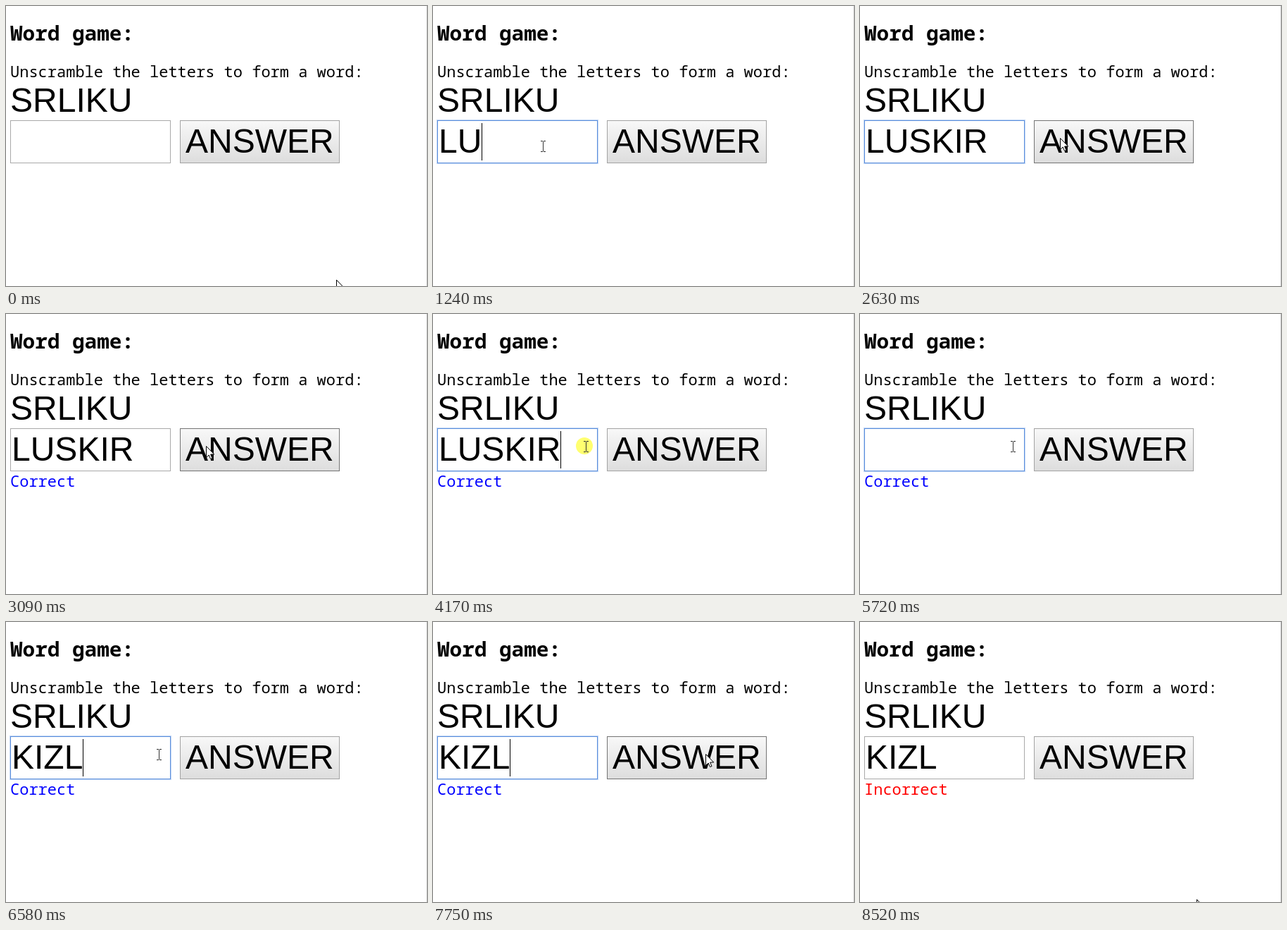
Recreate the animation shown at these times as an HTML page. Size 598 by 397 pixels, loop 8600 ms.

```html
<!DOCTYPE html>
<html lang="en">
<head>
<meta charset="utf-8">
<title>Word game</title>
<style>
  html, body { margin: 0; width: 100%; height: 100%; overflow: hidden; background: #fff; }
  svg { display: block; width: 598px; height: 397px; }
  text { white-space: pre; }
  .mono { font: 22px "Noto Sans Mono", "DejaVu Sans Mono", monospace; }
  .title { font-size: 29.33px; font-weight: 600; }
  .big { font: 48px "Liberation Sans", Arial, sans-serif; }
  .box { shape-rendering: crispEdges; }
</style>
</head>
<body>
<svg viewBox="0 0 598 397">
  <defs>
    <linearGradient id="face" x2="0" y2="1">
      <stop offset="0" stop-color="#f8f8f8"/>
      <stop offset="1" stop-color="#dddddd"/>
    </linearGradient>
    <linearGradient id="pressed" x2="0" y2="1">
      <stop offset="0" stop-color="#dddddd"/>
      <stop offset="1" stop-color="#f8f8f8"/>
    </linearGradient>
  </defs>
  <rect class="box" x="597" width="1" height="397" fill="#dcdcdc"/>
  <text class="mono title" x="6" y="49">Word game:</text>
  <text class="mono" x="6" y="101">Unscramble the letters to form a word:</text>
  <text class="big" x="6" y="150">SRLIKU</text>

  <rect id="glow" class="box" x="5.5" y="161.5" width="229" height="62" fill="none" stroke="#c3d7f5"/>
  <rect id="field" class="box" x="6.5" y="162.5" width="227" height="60" fill="#fff"/>
  <text id="entry" class="big" x="8" y="208"></text>
  <rect id="caret" class="box" y="166" width="1" height="53"/>

  <rect id="button" class="box" x="247.5" y="162.5" width="226" height="60"/>
  <text class="big" x="255" y="208">ANSWER</text>
  <text id="result" class="mono" x="6" y="245"></text>

  <g id="pointer">
    <circle id="ring" r="12" fill="#ffff70" style="mix-blend-mode: multiply"/>
    <path id="arrow" d="M.5 .5V16.5L4.2 13L6.6 18.5L9 17.5L6.6 12H11.7Z" fill="#fff" stroke="#000"/>
    <path id="beam" d="M-3 -7.5H0M1 -7.5H4M.5 -7V7M-3 7.5H0M1 7.5H4" fill="none" stroke="#333"/>
  </g>
</svg>
<script>
const LOOP = 8600;
const $ = id => document.getElementById(id);
const set = (id, attrs) => {
  for (const key in attrs) $(id).setAttribute(key, attrs[key]);
};
const show = (id, on) => set(id, { visibility: on ? "visible" : "hidden" });

const start = {
  at: [469, 388], beam: false, click: false, hover: false, press: false,
  focus: false, caret: false, entry: "", result: ""
};

// Each step: time in ms, then what changes
const steps = [
  [70, { at: [464, 376] }],
  [150, { at: [440, 335] }],
  [230, { at: [370, 276] }],
  [300, { at: [280, 232] }],
  [380, { at: [198, 206], beam: true }],
  [460, { at: [156, 199], click: true, focus: true, caret: true }],
  [530, { click: false }],
  [990, { caret: false }],
  [1070, { entry: "L", caret: true }],
  [1240, { entry: "LU" }],
  [1390, { entry: "LUS" }],
  [1540, { entry: "LUSK" }],
  [1770, { entry: "LUSKI" }],
  [1940, { entry: "LUSKIR" }],
  [2400, { at: [172, 198], caret: false }],
  [2480, { at: [214, 195] }],
  [2550, { at: [258, 191], beam: false, hover: true }],
  [2630, { at: [284, 187] }],
  [2860, { click: true, press: true, focus: false }],
  [3010, { press: false, result: "Correct" }],
  [3090, { click: false }],
  [3550, { at: [276, 187] }],
  [3630, { at: [256, 187] }],
  [3710, { at: [238, 188], hover: false }],
  [3780, { at: [224, 188], beam: true }],
  [3860, { at: [217, 188] }],
  [4170, { click: true, focus: true, caret: true }],
  [4320, { click: false }],
  [4550, { caret: false }],
  [4630, { entry: "LUSKI" }],
  [4710, { entry: "LUSK" }],
  [4860, { entry: "LUS" }],
  [5010, { entry: "LU" }],
  [5180, { entry: "L" }],
  [5250, { caret: true }],
  [5420, { entry: "" }],
  [5720, { caret: false }],
  [6120, { entry: "K", caret: true }],
  [6200, { entry: "KI" }],
  [6500, { entry: "KIZ" }],
  [6580, { entry: "KIZL" }],
  [7130, { at: [150, 212], caret: false }],
  [7210, { at: [69, 237] }],
  [7280, { at: [125, 232] }],
  [7360, { at: [215, 214] }],
  [7440, { at: [330, 196], beam: false }],
  [7510, { at: [400, 190] }],
  [7680, { at: [392, 188], hover: true, caret: true }],
  [7750, { at: [387, 187] }],
  [7830, { click: true, press: true, focus: false, caret: false }],
  [7910, { click: false, press: false, result: "Incorrect" }],
  [8210, { at: [405, 214] }],
  [8290, { at: [440, 305], hover: false }],
  [8370, { at: [460, 375] }],
  [8520, { at: [478, 393] }]
];

function stateAt(time) {
  const state = { ...start };
  for (const [t, change] of steps) {
    if (t > time) break;
    Object.assign(state, change);
  }
  return state;
}

function draw(s) {
  $("entry").textContent = s.entry;
  const width = s.entry ? $("entry").getComputedTextLength() : 0;
  set("caret", { x: Math.round(8 + width) });
  show("caret", s.caret);

  set("field", { stroke: s.focus ? "#5a8ddb" : "#a9a9a9" });
  show("glow", s.focus);
  set("button", {
    fill: s.press ? "url(#pressed)" : "url(#face)",
    stroke: s.hover ? "#747474" : "#a3a3a3"
  });

  $("result").textContent = s.result;
  set("result", { fill: s.result === "Correct" ? "#00f" : "#f00" });

  set("pointer", { transform: `translate(${s.at})` });
  set("ring", s.beam ? { cx: -2, cy: -1 } : { cx: 0, cy: 0 });
  show("ring", s.click);
  show("beam", s.beam);
  show("arrow", !s.beam);
}

const begun = performance.now();
function tick() {
  draw(stateAt((performance.now() - begun) % LOOP));
  requestAnimationFrame(tick);
}
tick();
</script>
</body>
</html>
```
